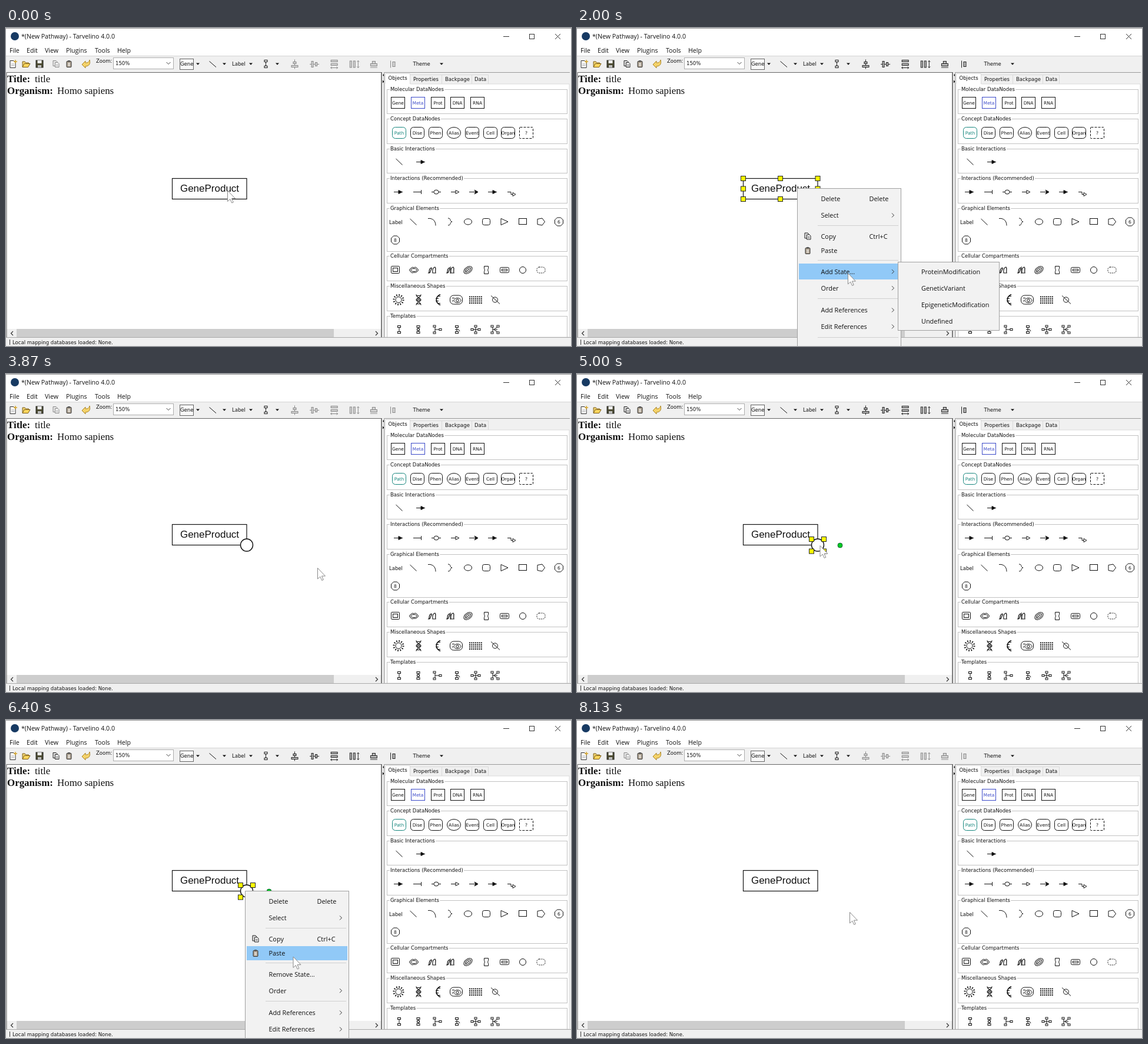
An HTML page for the animation above (8.27 s loop, 960 px wide and 540 px high).

```html
<!DOCTYPE html>
<html lang="en">
<head>
<meta charset="utf-8">
<title>Pathway editor</title>
<style>
  html, body { margin: 0; width: 100%; height: 100%; overflow: hidden; background: #fff; }
  svg { display: block; width: 100%; height: 100%; }
  text { white-space: pre; }
  .ui { font: 8.5px "DejaVu Sans", sans-serif; }
  .tiny { font: 7.6px "DejaVu Sans", sans-serif; text-anchor: middle; }
  .title { font: 10.6px "Open Sans", sans-serif; }
  .menu { font: 10.9px "Open Sans", sans-serif; }
  .serif { font: 16.9px "Liberation Serif", serif; }
  .bold { font: bold 16.9px "Liberation Serif", serif; }
  .node { font: 17px "Liberation Sans", sans-serif; text-anchor: middle; }
  .captions text { paint-order: stroke; stroke: #fff; stroke-width: 4px; }
</style>
</head>
<body>
<svg id="stage" viewBox="0 0 960 540"></svg>
<script>
const LOOP = 8270;

// Markup helpers; text is placed by its vertical middle, with whole-pixel baselines.
const text = (x, y, s, cls = 'ui', fill = '#111') => {
  const drop = { ui: 3, tiny: 2.8, title: 3.9, menu: 4, node: 5.8, serif: 5.3, bold: 5.3 }[cls];
  return `<text x="${x}" y="${Math.round(y + drop)}" class="${cls}" fill="${fill}">${s}</text>`;
};
const rect = (x, y, w, h, fill = 'none', stroke = 'none', rx = 0, extra = '') =>
  `<rect x="${x}" y="${y}" width="${w}" height="${h}" rx="${rx}" fill="${fill}" stroke="${stroke}" ${extra}/>`;
const path = (d, stroke = '#111', fill = 'none', width = 1, extra = '') =>
  `<path d="${d}" stroke="${stroke}" fill="${fill}" stroke-width="${width}" ${extra}/>`;
const oval = (x, y, rx, ry = rx, fill = 'none', stroke = '#111', extra = '') =>
  `<ellipse cx="${x}" cy="${y}" rx="${rx}" ry="${ry}" fill="${fill}" stroke="${stroke}" ${extra}/>`;
const at = (x, y, body) => `<g transform="translate(${x} ${y})">${body}</g>`;
const group = (id, body) => `<g id="${id}">${body}</g>`;
const chevron = (x, y) => path(`M${x - 2} ${y - 3.5}l3.5 3.5l-3.5 3.5`, '#333');
const dropArrow = x => path(`M${x - 3} 59.5h6l-3 3.2z`, 'none', '#111');

// Icons drawn around their own centre
const copyIcon = path('M-5-5.5h5l2 2v7h-7z', '#222', '#ddd') + path('M-1.5-2.5h4.5l2 2v6h-6.5z', '#222', '#fff') +
  path('M0 1h3.5M0 3.2h3.5', '#555');
const pasteIcon = rect(-4, -4.5, 8, 10, '#a99c8a', '#333', 1) + rect(-2, -6, 4, 2.5, '#555') +
  path('M-2 -1h4M-2 1h4M-2 3h4', '#fff');
const pulley = path('M0-4V4') + rect(-2.5, -6.5, 5, 3, '#fff', '#111') + rect(-2.5, 3.5, 5, 3, '#fff', '#111');
const bar = (x, y, w, h) => rect(x, y, w, h, '#bbb', '#222');
const alignIcons = [
  path('M0-8V8', '#222') + bar(-2.5, -4, 5, 3) + bar(-5.5, 2, 11, 3),
  path('M-8 0H8', '#222') + bar(-5, -5, 3, 10) + bar(1.5, -3, 3, 6),
  bar(-5.5, -7, 11, 3) + bar(-5.5, -1, 11, 3) + path('M-6 6h12m-2-2l2 2l-2 2m-8-4l-2 2l2 2', '#222'),
  bar(-7, -5.5, 3, 11) + bar(-1, -5.5, 3, 11) + path('M7-6V6m-2-10l2-2l2 2m-4 8l2 2l2-2', '#222'),
  bar(-2.5, -5, 5, 4) + bar(-5.5, -1, 11, 4) + path('M-6 5.5H6', '#222'),
  path('M-5-6V6', '#222') + bar(-1.5, -4, 4, 8)
];

function windowChrome() {
  const menus = [['File', 6], ['Edit', 35], ['View', 66], ['Plugins', 102], ['Tools', 151], ['Help', 189]];
  return rect(0, 0, 960, 540, '#f0f0f0') + rect(0, 0, 960, 47, '#fff') +
    path('M0 .5H960', '#999') + path('M0 47.5H960', '#d4d4d4') +
    oval(15, 14, 7, 7, '#173a63', 'none') +
    text(26, 14.5, '*(New Pathway) - Tarvelino 4.0.0', 'title') +
    path('M845 14.5h10M933 10l9 9m0-9l-9 9', '#333') + rect(889.5, 10.5, 8, 8, 'none', '#333') +
    menus.map(([s, x]) => text(x, 38, s, 'title')).join('');
}

function toolbar() {
  return at(12, 61, path('M-5-5.5h6l3 3v9h-9z', '#333', '#fff') + path('M-3 0h5M-3 2.5h5', '#aaa') + path('M4-7v6M1-4h6', '#d5a52a', 'none', 1.4)) +
    at(34, 61, path('M-6 5v-9h4l1.5 2h5v2', '#7a5c17', '#f3d675') + path('M-6 5.5l3-6h10l-3.5 6z', '#7a5c17', '#ffd75e')) +
    at(57, 61, rect(-6, -6, 12, 12, '#4b4a30', '#222') + rect(-3.5, -6, 7, 5, '#eee') + rect(-3, 2, 6, 4, '#bbb')) +
    group('copyTool', at(85, 61, copyIcon)) + at(107, 61, pasteIcon) +
    at(136, 61, path('M-7 1l6-6v3c4 0 6-1 7-5c2 7-1 11-7 11v3z', '#a88225', '#f5d36a')) +
    text(153, 56, 'Zoom:') + rect(182.5, 50.5, 102, 19, '#fff', '#adadad') + text(186, 60, '150%') +
    path('M272.5 58l3.5 3.5l3.5-3.5', '#444') +
    rect(295.5, 52.5, 23, 18, '#f8f8f8', '#666') + text(296, 61, 'Gene') +
    path('M345.5 56.5l11.5 10') + text(384, 61, 'Label') + at(441.5, 61, pulley) +
    group('alignTools', alignIcons.map((icon, i) => at(490.5 + i * 33.6, 61.5, icon)).join('')) +
    text(691.5, 61, 'Theme') + [326, 371, 416, 461, 740].map(dropArrow).join('');
}

function canvasArea() {
  return rect(1, 75, 637, 436, '#fff') + path('M1 525V75.5H638', '#666') + path('M638 75V525', '#555', 'none', 1.5) +
    text(2, 87, 'Title:', 'bold') + text(49, 87, 'title', 'serif') +
    text(2, 106.5, 'Organism:', 'bold') + text(87, 106.5, 'Homo sapiens', 'serif') +
    rect(2, 511, 635, 14, '#f0f0f0') + rect(18, 511, 539, 14, '#cdcdcd') +
    path('M12 515l-3.5 3.5l3.5 3.5M628 515l3.5 3.5l-3.5 3.5', '#333', 'none', 1.2) +
    path('M0 525.5H960', '#aaa') + path('M6.5 529v9', '#333') + text(11, 534, 'Local mapping databases loaded: None.') +
    path('M642.5 77.5v5l-2.5-2.5zM640 88.5v5l2.5-2.5z', 'none', '#111');
}

const filledHead = x => path(`M${x} -3l6 3l-6 3z`, '#111', '#111');
const shaft = (from, to) => path(`M${from} .5H${to}`);
const arrow = shaft(-8, 7) + at(0, .5, filledHead(0));
const diagonal = path('M-5.5-5L5.5 5.5');
const octagon = path('M-3-7h6l4 4v6l-4 4h-6l-4-4v-6z');
const square = (x, y) => rect(x - 2, y - 1.5, 4, 3, '#fff', '#111');

function objectsPanel() {
  const titles = [['Molecular DataNodes', 104, 145], ['Concept DataNodes', 154, 196], ['Basic Interactions', 205, 246],
    ['Interactions (Recommended)', 255, 297], ['Graphical Elements', 306, 379], ['Cellular Compartments', 387, 429],
    ['Miscellaneous Shapes', 438, 480], ['Templates', 489, 532]];
  const frames = titles.map(([s, top, bottom]) =>
    rect(647.5, top + .5, 306, bottom - top, 'none', '#c2c2c2') + text(653, top, s)).join('');
  const molecules = ['Gene', 'Meta', 'Prot', 'DNA', 'RNA'].map((s, i) => {
    const color = i == 1 ? '#3c4ac8' : '#111';
    return at(Math.round(666 + i * 33.75), 127, rect(-11.5, -9.5, 23, 19, '#fff', color) + text(0, 0, s, 'tiny', color));
  }).join('');
  const concepts = ['Path', 'Dise', 'Phen', 'Alias', 'Event', 'Cell', 'Organ', '?'].map((s, i) => {
    const color = i ? '#111' : '#14857c';
    const shape = i == 3 ? oval(0, 0, 11.5, 9.5) : rect(-11.5, -9.5, 23, 19, '#fff', color, i == 7 ? 1 : 5, i == 7 ? 'stroke-dasharray="4 2"' : '');
    return at(Math.round(668 + i * 30.9), 178, shape + text(0, 0, s, 'tiny', color));
  }).join('');
  const row = (y, items) => items.map(([x, icon]) => at(x, y, icon)).join('');
  const interactions = [
    [667, arrow], [699, shaft(-7, 6) + path('M6.5-3v7')],
    [731, shaft(-8, -4) + oval(0, .5, 4, 3.5) + shaft(4, 8)],
    [763, shaft(-7, 1) + path('M1-2.5l6 3l-6 3z')],
    [795, shaft(-8, 6) + path('M1-3l6 3.5l-6 3.5l2-3.5z', '#111', '#111')], [827, arrow],
    [859, path('M-7 .5h6v4h3M2 1.5l5 3l-5 3z')]
  ];
  const graphics = [
    [692, diagonal], [724, path('M-7-5.5c8-1 13 4 13 12')],
    [755, path('M-4-6c6 0 2 5 7 6c-5 1-1 6-7 6')], [785, oval(0, 0, 6.5, 5)],
    [816, rect(-6.5, -5.5, 13, 11, 'none', '#111', 3)], [847, path('M-6-5.5L6 0L-6 5.5z')],
    [878, rect(-6.5, -5.5, 13, 10, 'none', '#111')], [909, path('M-6-4.5L2-6L6.5 0L2 6L-6 4.5z')],
    [939.5, octagon + text(0, 0, '6', 'tiny')]
  ];
  const leaf = path('M-6 5c2-2 0-5 3-8c3-2 3 1 1 3c-2 3 0 5-4 5zM1 5c-1-5 1-10 4-10c2 2 0 6 1 10z', '#111', 'none', 1.2);
  const compartments = [
    [662, rect(-7.5, -6.5, 14, 12, 'none', '#111', 1) + rect(-4.5, -3.5, 8, 6, 'none', '#111')],
    [693, path('M-5-3q2-3 5-1q4-2 5 1q5 3 0 6q-2 2-5 1q-4 2-5-1q-5-3 0-6z') + oval(0, 0, 5, 2.5)],
    [724, leaf], [755, leaf + path('M0-6V6')],
    [785, `<g transform="rotate(-35)">${oval(0, 0, 8, 5) + oval(0, 0, 5.5, 3) + path('M-4 0h8', '#111', 'none', 2, 'stroke-dasharray="1.5 1"')}</g>`],
    [816, path('M-3.5-6.5h7v4l-1 2.5l1 2.5v4h-7v-4l1-2.5l-1-2.5z')],
    [847, rect(-7.5, -4.5, 15, 9, 'none', '#111', 2) + rect(-4.5, -1.5, 9, 3, 'none', '#111')],
    [878, oval(0, 0, 5.5)],
    [909, rect(-7, -5, 14, 10, 'none', '#111', 4, 'stroke-dasharray="2 1.5"')]
  ];
  const misc = [
    [667, oval(0, 0, 8, 8, 'none', '#111', 'stroke-width="3" stroke-dasharray="1.6 2.6"') + oval(0, 0, 5)],
    [701, path('M-4-9c0 6 8 6 8 9s-8 4-8 9M4-9c0 6-8 6-8 9s8 4 8 9', '#111', 'none', 1.2) + path('M-3-7h6M-3-1h6M-3 1h6M-3 7h6')],
    [734, path('M4-9c-9 4-9 14 0 18', '#111', 'none', 1.6) + path('M4-6h-5M1-2h-5M1 2h-5M4 6h-5')],
    [765, rect(-10.5, -7.5, 21, 15, 'none', '#111', 6) + oval(2, 1, 6, 4) + oval(2, 1, 2.5, 2) + path('M-7-3h4M-7 2h2')],
    [798, [-5, -1.5, 2, 5.5].map(y => path(`M-11 ${y}h22`, '#111', 'none', 2.2, 'stroke-dasharray="2 1.3"')).join('')],
    [831, oval(0, 0, 4.5) + path('M-7-7L8 7')]
  ];
  const branch = path('M-4-4v8M-4 0h8') + square(-5, -5.5) + square(-5, 5.5);
  const templates = [
    [668, pulley], [700.5, pulley + square(0, 0)], [733, branch + square(5, 0)], [766, pulley + path('M-3 0h6l2 3')],
    [798, path('M-6 0H6M0-5V5') + square(-6, 0) + square(6, 0) + square(0, -5.5) + square(0, 5.5)],
    [831, branch + path('M-2 0l7-5M-2 0l7 5') + square(5, -5.5) + square(5, 5.5)]
  ];
  return rect(644, 95, 313, 430, '#fff', '#dcdcdc') + rect(644, 77, 43, 19, '#fff') +
    path('M642.5 525V75.5H958', '#999') +
    path('M644.5 95V77.5H686.5V95M687 79.5H819.5V95M740.5 80V95M791.5 80V95', '#d9d9d9') +
    text(649.5, 85, 'Objects') + text(692, 87, 'Properties') + text(746, 87, 'Backpage') + text(796, 87, 'Data') +
    `<g class="captions">${frames}</g>` + molecules + concepts +
    row(227, [[668, diagonal], [705, arrow]]) + row(278, interactions) +
    text(651, 330, 'Label') + row(329, graphics) + at(661.5, 360, octagon + text(0, 0, '8', 'tiny')) +
    row(411, compartments) + row(461.5, misc) + row(512, templates) +
    rect(643, 526, 317, 14, '#f0f0f0') + path('M643 525.5H960', '#aaa');
}

const handle = (x, y) => rect(x - 4, y - 4, 8, 8, '#ff0', '#222');
const nodeHandles = [282.5, 345.5, 409].map(x => [255.5, 273, 290.5].map(y =>
  x == 345.5 && y == 273 ? '' : handle(x, y)).join('')).join('');
const stateHandles = [398.5, 419.5].map(x => handle(x, 280.5) + handle(x, 301)).join('') + oval(447, 291, 4, 4, '#0c2', '#163');

function contextMenu(stateItem, hasSubmenu) {
  const items = [['Delete', 18], ['Select', 46], ['Copy', 82], ['Paste', 106], [stateItem, 141.7],
    ['Order', 169.7], ['Add References', 207], ['Edit References', 235]];
  const arrows = [46, 169.7, 207, 235].concat(hasSubmenu ? 141.7 : []);
  return rect(.5, .5, 176, 290, '#f2f2f2', '#a0a0a0') +
    '<rect class="hot" x="3" width="171" fill="#91c9f7"/>' +
    [63.5, 122.5, 187.5, 253.5].map(y => path(`M35 ${y}H172`, '#d0d0d0')).join('') +
    items.map(([s, y]) => text(40.5, y, s, 'menu')).join('') +
    text(122.5, 18, 'Delete', 'menu') + text(122.5, 82, 'Ctrl+C', 'menu') +
    arrows.map(y => chevron(163, y)).join('') + at(18, 81.5, copyIcon) + at(18, 106, pasteIcon);
}

const submenu = rect(545.5, 397.5, 172, 116, '#f2f2f2', '#a0a0a0') +
  group('subHot', rect(548, 400, 167, 27, '#91c9f7')) +
  ['ProteinModification', 'GeneticVariant', 'EpigeneticModification', 'Undefined']
    .map((s, i) => text(585, 413.7 + i * 28, s, 'menu')).join('');

const stage = document.getElementById('stage');
stage.innerHTML = windowChrome() + toolbar() + canvasArea() + objectsPanel() +
  rect(282.5, 255.5, 126.5, 35, '#fff', '#111', 0, 'stroke-width="1.2"') + text(346, 272.5, 'GeneProduct', 'node') +
  group('state', oval(409, 290.5, 10.5, 10.5, '#fff', '#111', 'stroke-width="1.4"')) +
  group('nodeSel', nodeHandles) + group('stateSel', stateHandles) +
  group('menuA', at(374, 272, contextMenu('Add State...', true))) +
  group('menuB', at(406, 290, contextMenu('Remove State...', false))) +
  group('submenu', submenu) +
  group('cursor', path('M0 0V18.5L4.3 14.6L7.2 21L9.8 19.9L7 13.6H13z', '#888', '#fff'));

const el = id => document.getElementById(id);
const show = (id, on) => el(id).setAttribute('visibility', on ? 'visible' : 'hidden');

// Cursor stops: time, x, y
const stops = [[0, 376.5, 276], [130, 376.5, 276], [330, 374.5, 272.5], [1330, 374.5, 272.5], [1470, 452, 414.5], [1740, 458, 417],
  [2200, 462, 416], [2600, 611.5, 420.5], [3130, 611.5, 420.5], [3600, 529.5, 329.5], [4400, 529.5, 329.5],
  [4870, 413, 291.5], [5270, 413, 291.5], [5600, 406.5, 290], [6130, 406.5, 290], [6400, 488, 402],
  [6670, 490, 427], [7200, 490, 427], [7600, 463.5, 326.5], [LOOP, 463.5, 326.5]];

function cursorAt(t) {
  const i = stops.findIndex(s => s[0] > t);
  const [t0, x0, y0] = stops[i - 1], [t1, x1, y1] = stops[i];
  const u = (t - t0) / (t1 - t0), k = u * u * (3 - 2 * u);
  return [x0 + (x1 - x0) * k, y0 + (y1 - y0) * k];
}

function highlight(menu, middle, height) {
  const hot = el(menu).querySelector('.hot');
  hot.setAttribute('y', middle - height / 2);
  hot.setAttribute('height', height);
}

function draw(t) {
  const within = (a, b) => t >= a && t < b;
  const [x, y] = cursorAt(t);
  const nodeSelected = within(270, 3800), stateSelected = within(5000, 7200);
  el('cursor').setAttribute('transform', `translate(${x} ${y})`);
  show('nodeSel', nodeSelected);
  show('stateSel', stateSelected);
  show('state', within(3060, 7200));
  show('menuA', within(800, 3000));
  show('menuB', within(5870, 7200));
  show('submenu', within(1740, 3000));
  show('subHot', within(1740, 3000) && x > 547);
  highlight('menuA', 141.5, t >= 1540 ? 27 : 0);
  if (y < 384) highlight('menuB', 106, 0);
  else if (y < 412) highlight('menuB', 106, 24);
  else highlight('menuB', 141.5, 27);
  for (const id of ['copyTool', 'alignTools'])
    el(id).setAttribute('opacity', nodeSelected || stateSelected ? 1 : .5);
}

function tick() {
  draw(performance.now() % LOOP);
  requestAnimationFrame(tick);
}
tick();
</script>
</body>
</html>
```
